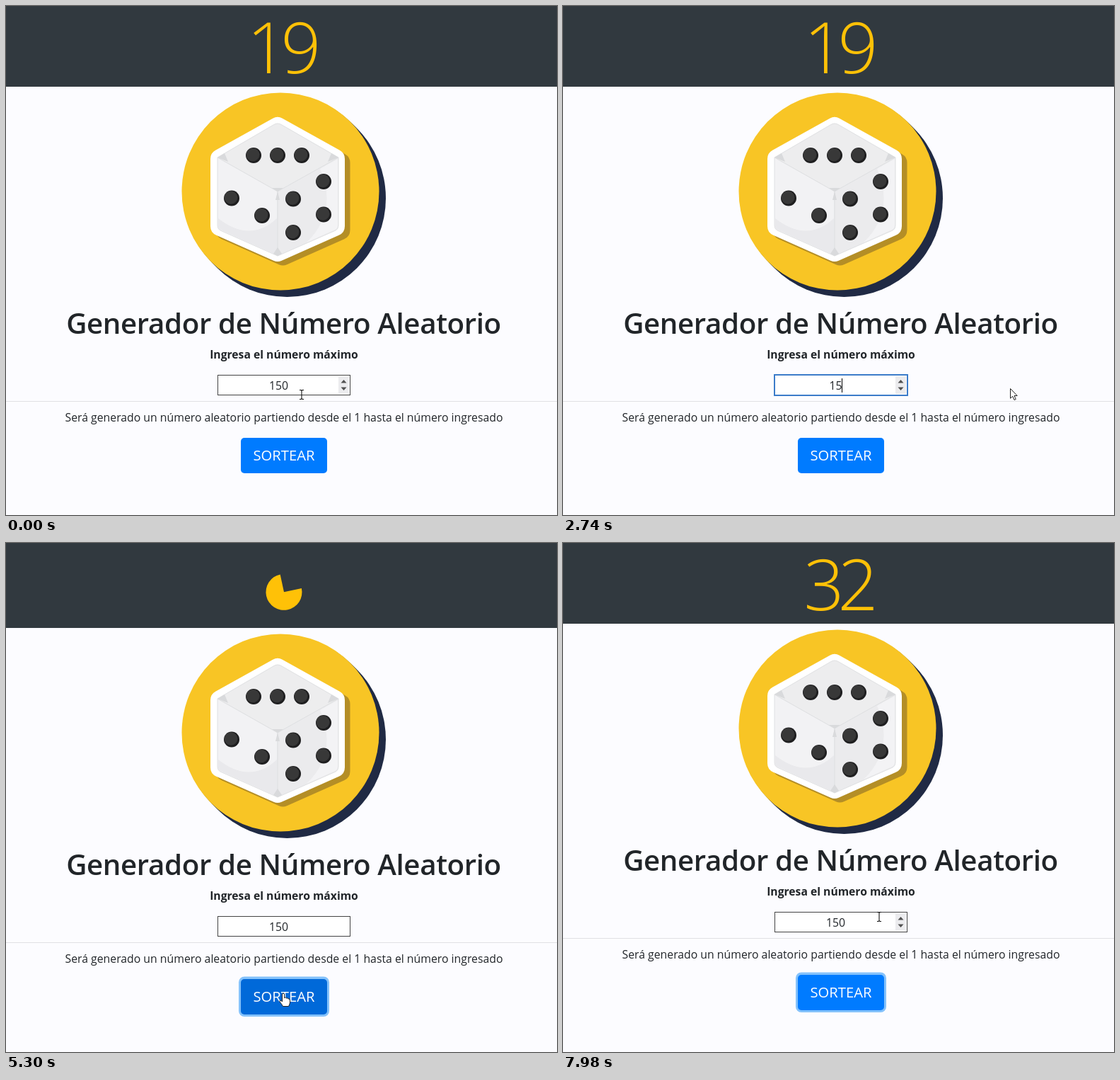
An HTML page that plays this animation: 779x719 px, repeating every 8 s.

```html
<!DOCTYPE html>
<html lang="es">
<head>
<meta charset="utf-8">
<title>Generador de Número Aleatorio</title>
<style>
html, body { margin: 0; width: 100%; height: 100%; overflow: hidden; background: #fcfcff; }
svg { display: block; width: 100%; height: 100%; }
text { font-family: "Open Sans", "Noto Sans", sans-serif; font-size: 15.8px; fill: #212529; text-anchor: middle; white-space: pre; }
#number { font-size: 100px; font-weight: 300; fill: #ffc107; letter-spacing: -9px; }
#title { font-size: 40.3px; font-weight: 600; letter-spacing: -.4px; }
#label { font-size: 15.7px; font-weight: 700; }
#go { font-size: 20.2px; fill: #fff; }
</style>
</head>
<body>
<svg viewBox="0 0 779 719">
  <rect width="779" height="719" fill="#fcfcff"/>
  <rect id="header" width="779" height="114" fill="#31393f"/>
  <text id="number" x="388.5" y="95">19</text>
  <path id="spinner" d="M0 0L18 18A25.5 25.5 0 1 1 18 -18Z" fill="#ffc107"/>

  <g id="page">
    <path d="M390 264L397.5 271.5" stroke="#202a44" stroke-width="279" stroke-linecap="round"/>
    <circle cx="388" cy="262" r="139.5" fill="#f8c525"/>
    <g stroke-width="28" stroke-linejoin="round">
      <path d="M384 171L465 216V311L384 347L303 311V216Z" transform="translate(7.5 5.5)" fill="#b48e26" stroke="#b48e26"/>
      <path d="M384 171L465 216V311L384 347L303 311V216Z" fill="#fff" stroke="#fff"/>
    </g>
    <g stroke="#dfe0e2" stroke-width="1" stroke-linejoin="round">
      <path d="M299 214L378 168Q384 164 390 168L470 214L384 262Z" fill="#ededee"/>
      <path d="M299 214L384 262V353L303 317Q299 315 299 310Z" fill="#f2f2f4"/>
      <path d="M470 214L384 262V353L466 317Q470 315 470 310Z" fill="#ebebed"/>
    </g>
    <path d="M300 300Q345 335 383 300V352L303 316Q300 314 300 310Z" fill="#e9e9ec"/>
    <path d="M469 216V310Q469 314 465 316L425 334Q470 290 444 230Z" fill="#f3f3f5"/>
    <path d="M299 214L309 208L314 220ZM470 214L460 208L455 220ZM384 262L376 257H392ZM384 262L381 274H387ZM384 353L378 350L384 341L390 350Z" fill="#d9dadc"/>
    <g id="pips"></g>

    <text id="title" x="392.5" y="463">Generador de Número Aleatorio</text>
    <text id="label" x="393" y="498">Ingresa el número máximo</text>
    <rect id="field" fill="#fff"/>
    <g id="arrows">
      <rect x="470" y="523" width="15" height="25" fill="#ececee"/>
      <path d="M473.5 532.5L477.5 528L481.5 532.5ZM473.5 538.5L477.5 543L481.5 538.5Z" fill="#505050"/>
    </g>
    <rect id="sel" y="524" height="23" fill="#3297fd"/>
    <text x="385.5" y="542"><tspan id="plain"></tspan><tspan id="picked" fill="#fff"></tspan></text>
    <rect id="caret" y="526" width="1" height="20" fill="#000"/>
    <path d="M0 558.5H779" stroke="#000" stroke-opacity=".11"/>
    <text x="393" y="587">Será generado un número aleatorio partiendo desde el 1 hasta el número ingresado</text>
    <rect id="ring" x="329" y="606.5" width="128" height="56.5" rx="8" fill="#84c2fb"/>
    <rect id="button" x="332" y="610" width="122" height="50" rx="5"/>
    <text id="go" x="393" y="642.3">SORTEAR</text>
  </g>

  <g id="cursor">
    <path id="beam" d="M-3 -6.5H-1L0 -5.5L1 -6.5H3M0 -5.5V5.5M-3 6.5H-1L0 5.5L1 6.5H3" fill="none" stroke="#111" stroke-width="1.1"/>
    <path id="arrow" d="M.5 .5V14.2L3.7 11.3L6 16.5L8.2 15.5L6 10.5H10.2Z" fill="#fff" stroke="#222"/>
    <path id="hand" d="M-1.5 1Q0 -1 1.5 1V6.5Q3.5 5 4.5 7Q6.5 6 7.3 8Q9.5 7.5 9.5 10V13Q9 16 7.5 18.5H-.5Q-2 15.5 -5 12Q-5.5 9.5 -3 10.3L-1.5 12Z" fill="#fff" stroke="#222"/>
  </g>
</svg>
<script>
const LOOP = 8000, FOCUS = 260, PRESS = 4450, SPIN = 4670, DONE = 6680;
const HOVER_IN = 4210, HOVER_OUT = 6280, DIGIT = 9, MID = 385.5;
const el = {};
document.querySelectorAll('[id]').forEach(n => el[n.id] = n);
const set = (n, attrs) => { for (const k in attrs) n.setAttribute(k, attrs[k]); };
const show = (n, on) => set(n, { visibility: on ? 'visible' : 'hidden' });
const clamp = v => Math.max(0, Math.min(1, v));
const fade = (t, start) => clamp((t - start) / 150);

const pips = [[350, 211], [384, 211], [418, 211], [319, 271.5], [362, 296],
  [406, 272.5], [449, 248], [449, 294.5], [406, 320]];
el.pips.innerHTML = pips.map(([x, y]) =>
  `<circle cx="${x}" cy="${y}" r="11" fill="#1f1f20"/><circle cx="${x - 1}" cy="${y - 1}" r="9.3" fill="#383838"/>`).join('');

// time, x, y of the pointer
const path = [[120, 418, 549], [300, 410, 541], [900, 200, 532], [1040, 165, 525],
  [1160, 91, 528], [1700, 632, 540], [3420, 632, 540], [4160, 462, 650],
  [4420, 371, 638], [4760, 371, 638], [5320, 392, 636], [6140, 442, 618],
  [6640, 524, 531], [7380, 524, 531], [7960, 447, 528]];
// time and field value after each key press
const keys = [[0, '150'], [2080, '1'], [2460, '15'], [2940, '150']];
const idleBox = { x: 299.5, y: 521.5, width: 187, height: 28, stroke: '#444', 'stroke-width': 1 };
const focusBox = { x: 299, y: 521, width: 188, height: 29, stroke: '#3c7cc9', 'stroke-width': 2 };

function pointer(t) {
  const i = path.findIndex(p => p[0] > t);
  if (i === 0) return path[0].slice(1);
  if (i < 0) return path[path.length - 1].slice(1);
  const a = path[i - 1], b = path[i], u = (t - a[0]) / (b[0] - a[0]);
  const s = u * u * (3 - 2 * u);
  return [a[1] + (b[1] - a[1]) * s, a[2] + (b[2] - a[2]) * s];
}

function drawField(t, x, hovered) {
  const focused = t >= FOCUS && t < PRESS;
  const [typedAt, value] = keys.filter(k => k[0] <= t).pop();
  const left = MID - value.length * DIGIT / 2, right = MID + value.length * DIGIT / 2;
  let cut = value.length;
  if (focused && !typedAt)
    cut = t > 900 ? 0 : Math.round(clamp((x - left) / (right - left)) * value.length);
  const start = left + cut * DIGIT;
  el.plain.textContent = value.slice(0, cut);
  el.picked.textContent = value.slice(cut);
  set(el.sel, { x: start - .5, width: cut < value.length ? right - start + .5 : 0 });
  set(el.caret, { x: right - .5 });
  show(el.caret, focused && cut === value.length && (t - typedAt) % 1060 < 530);
  show(el.arrows, focused || hovered);
  set(el.field, focused ? focusBox : idleBox);
}

function drawCursor(x, y, type) {
  set(el.cursor, { transform: `translate(${Math.round(x)} ${Math.round(y)})` });
  for (const name of ['beam', 'arrow', 'hand']) show(el[name], name === type);
}

function draw(now) {
  let t = now % LOOP;
  if (t > 5320 && t < 5720) t = 5320;
  const busy = t >= SPIN && t < DONE, dy = busy ? 6 : 0;
  const [x, y] = pointer(t);
  const inside = (l, r, top, bottom) => x > l && x < r && y > top + dy && y < bottom + dy;
  const overField = inside(299, 487, 521, 550);
  const overButton = inside(332, 454, 610, 660);
  const dragging = t > FOCUS && t < 960;

  set(el.header, { height: 114 + dy });
  set(el.page, { transform: `translate(0 ${dy})` });
  el.number.textContent = t < SPIN ? '19' : '32';
  show(el.number, !busy);
  show(el.spinner, busy);
  set(el.spinner, { transform: `translate(393 69.3) rotate(${(t - SPIN) / 750 * 360})` });

  drawField(t, x, overField);
  const h = fade(t, HOVER_IN) - fade(t, HOVER_OUT);
  set(el.button, { fill: `rgb(0 ${Math.round(123 - 18 * h)} ${Math.round(255 - 38 * h)})` });
  set(el.ring, { opacity: fade(t, PRESS) });
  drawCursor(x, y, overField || dragging ? 'beam' : overButton ? 'hand' : 'arrow');
}

const begin = performance.now();
function tick() {
  draw(performance.now() - begin);
  requestAnimationFrame(tick);
}
tick();
</script>
</body>
</html>
```
